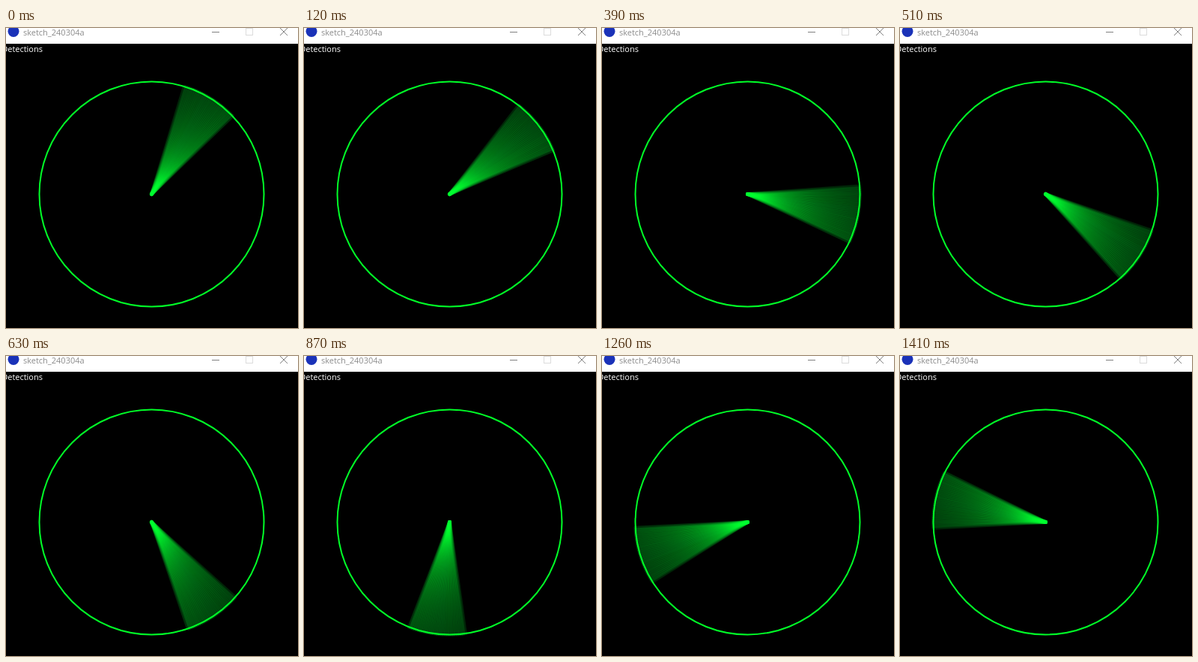
Animation of 390 by 400 pixels, one loop 1430 ms. Source, as an HTML page:

```html
<!DOCTYPE html>
<html lang="en">
<head>
<meta charset="utf-8">
<title>Radar sweep</title>
<style>
  html, body { margin: 0; width: 100%; height: 100%; overflow: hidden; background: #000; }
  svg { display: block; }
  text { font: 11px "Open Sans", "Noto Sans", sans-serif; }
</style>
</head>
<body>
<svg width="390" height="400" viewBox="0 0 390 400">
  <rect width="390" height="400" fill="#000"/>

  <!-- window title bar -->
  <rect width="390" height="21" fill="#fff"/>
  <circle cx="10" cy="4.5" r="7.5" fill="#1a32b8"/>
  <text x="23" y="10" fill="#8c8c8c">sketch_240304a</text>
  <g fill="none" stroke="#808080">
    <path d="M275 5.5h10"/>
    <rect x="320.5" y="0.5" width="9" height="9" stroke="#dcdcdc"/>
    <path d="M366 0l10 10M376 0l-10 10"/>
  </g>

  <text x="49" y="32" text-anchor="end" fill="#fff">Detections</text>

  <g transform="translate(194.5 221.5)" fill="none" stroke="#00ff32">
    <g id="sweep" stroke-width="5" stroke-linecap="round"></g>
    <circle r="150" stroke="#00ff28" stroke-width="2"/>
  </g>
</svg>
<script>
  const LOOP = 1430, RADIUS = 150, BEAMS = 30;
  // [start time in ms, angle of the leading beam in degrees]
  const STEPS = [
    [0, -44], [120, -23], [240, -1], [390, 25], [510, 48], [630, 71],
    [750, 91], [870, 111], [1020, 135], [1140, 156], [1260, 177], [1410, 206]
  ];
  const sweep = document.getElementById("sweep");

  // One beam per degree, fading slightly towards the tail.
  for (let i = BEAMS - 1; i >= 0; i--) {
    const beam = document.createElementNS("http://www.w3.org/2000/svg", "line");
    beam.setAttribute("x2", RADIUS);
    beam.setAttribute("transform", `rotate(${-i})`);
    beam.setAttribute("stroke-opacity", 0.18 - 0.04 * i / (BEAMS - 1));
    sweep.append(beam);
  }

  const start = performance.now();
  function draw() {
    const t = (performance.now() - start) % LOOP;
    const [, angle] = STEPS.findLast(([from]) => from <= t);
    sweep.setAttribute("transform", `rotate(${angle})`);
    requestAnimationFrame(draw);
  }
  draw();
</script>
</body>
</html>
```
